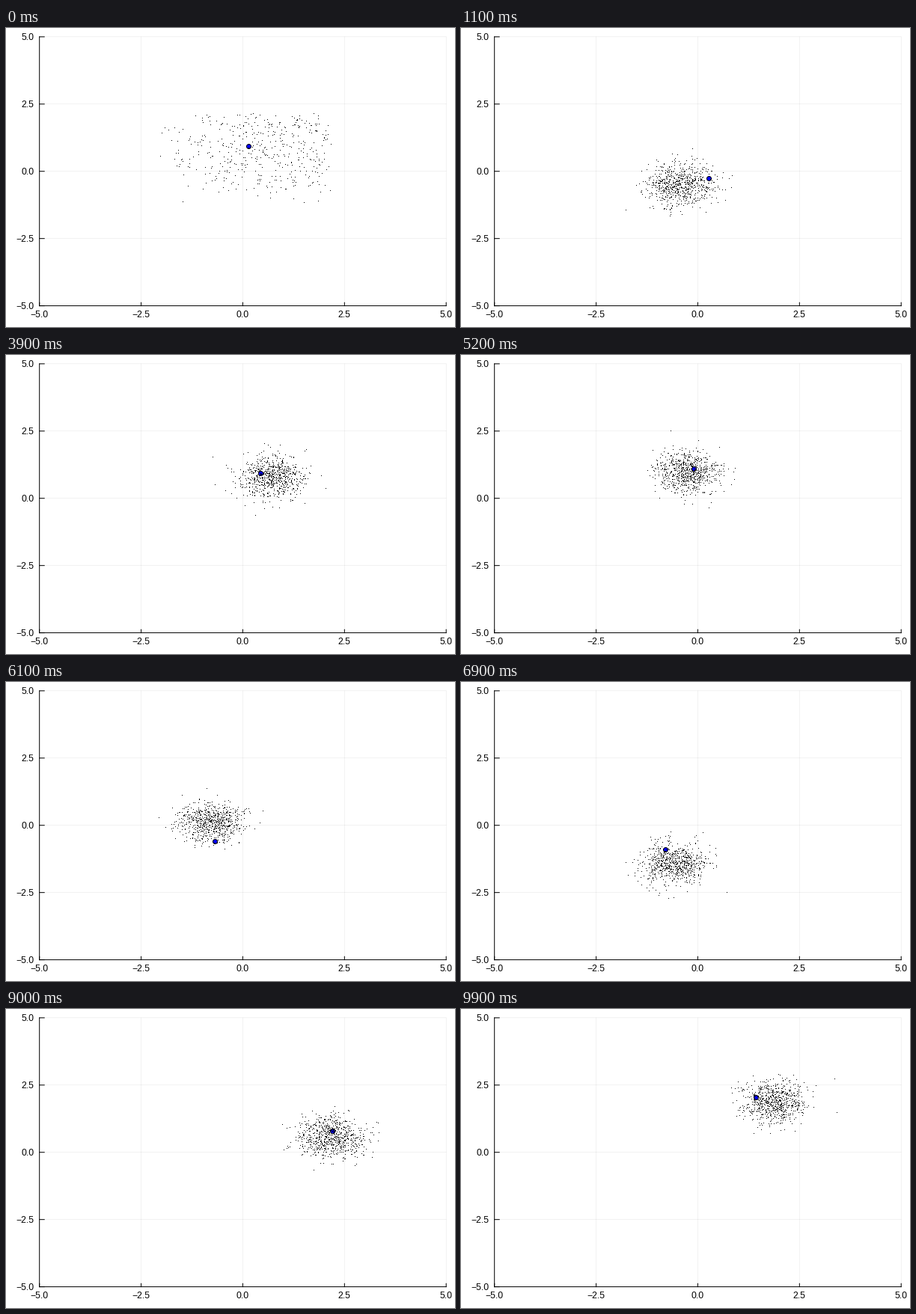
Animation, 600 px wide and 400 px high, one loop 10 s. Source, as a matplotlib script:

```python
import numpy as np
import matplotlib.pyplot as plt
from matplotlib.animation import FuncAnimation

FRAMES, DPI, N = 100, 100, 730
W, H = 600, 400
PX = 72 / DPI  # points per pixel
LAG = 2        # frames the cloud trails behind the ball

# Key points of the ball's walk: time, x, y
WALK = np.array([
    (-2, .44, .74), (0, .14, .95), (4, .15, 1.7), (9, -.45, -.5),
    (11, .27, -.25), (17, -.1, -1.6), (25, .1, -.85), (27, .35, -.5),
    (32, 1, .2), (42, .1, 1.1), (50, -.25, .93), (52, -.1, 1.1),
    (56, -.7, .8), (67, -.58, -1.45), (69, -.8, -.9), (74, -.6, -2),
    (78, .6, -1.02), (80, 1.1, -.53), (90, 2.2, .8), (97, 1.85, 1.85),
    (99, 1.43, 2.05)])
TIMES, POINTS = WALK[:, 0], WALK[:, 1:]
SLOPES = np.gradient(POINTS, TIMES, axis=0)


def walk(t):
    """Cubic Hermite curve through the key points."""
    i = np.clip(np.searchsorted(TIMES, t, side="right") - 1, 0, len(TIMES) - 2)
    h = TIMES[i + 1] - TIMES[i]
    u = (t - TIMES[i]) / h
    return ((1 + 2 * u) * (1 - u) ** 2 * POINTS[i] + u * (1 - u) ** 2 * h * SLOPES[i]
            + u * u * (3 - 2 * u) * POINTS[i + 1] + u * u * (u - 1) * h * SLOPES[i + 1])


def noise_states(keep=.8):
    """Start from a broad skewed block and drift into a normal cloud."""
    rng = np.random.default_rng(7)
    z = np.array([rng.beta(2.2, 1.5, N), -rng.beta(1.4, 2, N)])
    z = (z - z.mean(axis=1, keepdims=True)) / z.std(axis=1, keepdims=True)
    states = [z]
    for _ in range(FRAMES - 1):
        z = keep * z + np.sqrt(1 - keep ** 2) * rng.normal(size=(2, N))
        states.append(z)
    return states


def label(v):
    return f"{v:.1f}".replace("-", "\u2212")


plt.rcParams["font.family"] = "Liberation Sans"
fig = plt.figure(figsize=(W / DPI, H / DPI), dpi=DPI, facecolor="white")
left, right, top, bottom = 44.7, 588.19, 11.81, 371.61
ax = fig.add_axes([left / W, 1 - bottom / H, (right - left) / W, (bottom - top) / H])
ax.set(xlim=(-5, 5), ylim=(-5, 5))

ticks = np.linspace(-5, 5, 5)
names = [label(v) for v in ticks]
ax.set_xticks(ticks, names)
ax.set_yticks(ticks, names)
ax.tick_params(length=0, labelsize=12.2 * PX)
ax.tick_params(axis="x", pad=6 * PX)
ax.tick_params(axis="y", pad=7 * PX)

# Grid lines and inward ticks, left unsnapped for soft edges
for v in ticks:
    for line in (ax.axvline, ax.axhline):
        line(v, color="black", alpha=.1, lw=PX / 2, zorder=0, clip_on=False, snap=False)
        line(v, 0, .012, color="black", lw=PX, zorder=2, clip_on=False, snap=False)
for side, spine in ax.spines.items():
    spine.set(linewidth=PX, snap=False, visible=side in ("left", "bottom"))

ball, = ax.plot([], [], "o", ms=6 * PX, mfc="blue", mec="black", mew=PX, zorder=3)
dots, = ax.plot([], [], ",", color="black", antialiased=False, zorder=4)
states = noise_states()


def update(k):
    start = np.exp(-k / 4)
    spread = np.array([[.40 + .60 * start], [.39 + .42 * start]])
    count = int(N - 290 * start)
    dots.set_data(*(walk(k - LAG)[:, None] + spread * states[k][:, :count]))
    x, y = walk(k)
    ball.set_data([x], [y])
    return ball, dots


anim = FuncAnimation(fig, update, frames=FRAMES, interval=100, repeat=True, repeat_delay=0)
plt.show()
```
